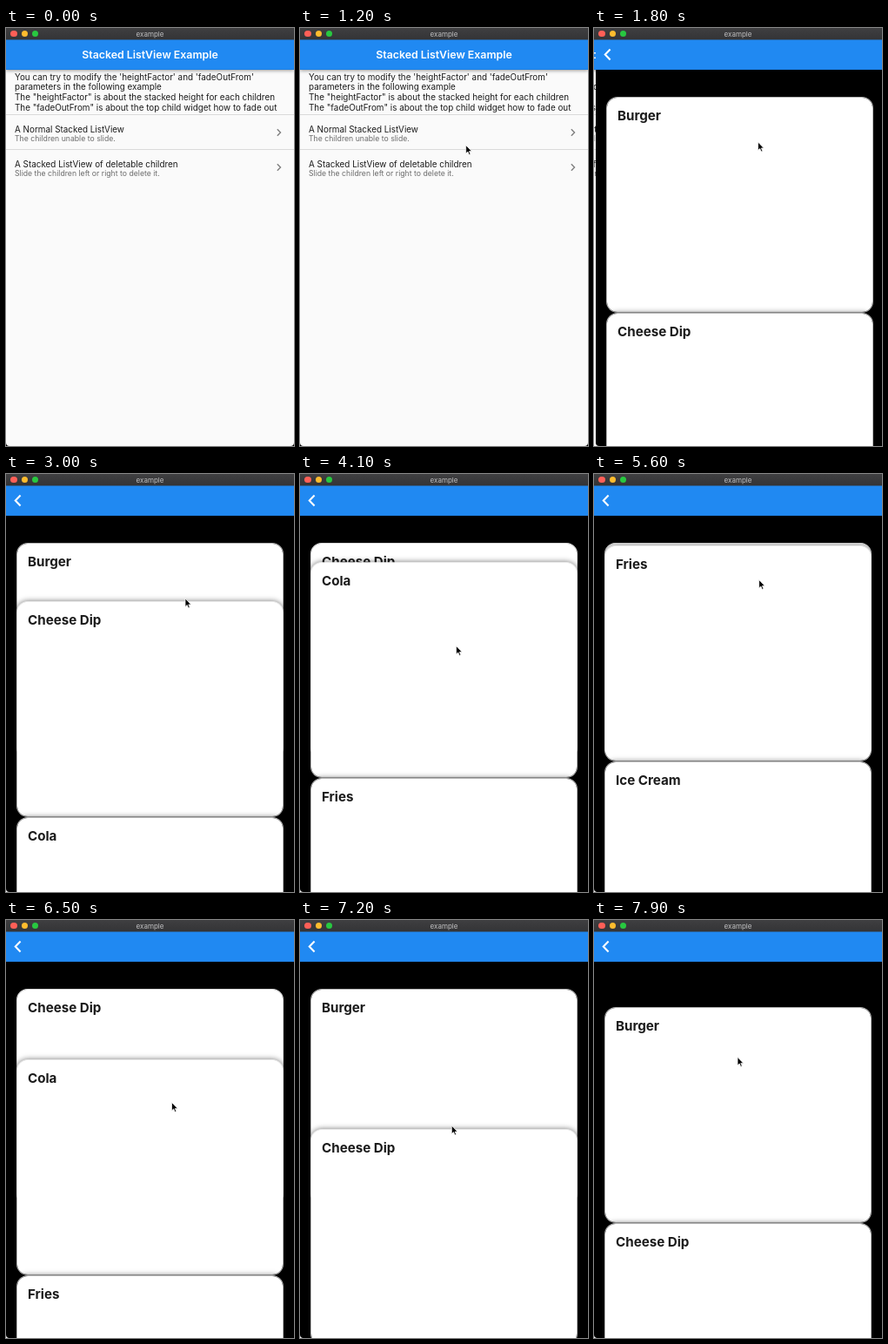
These frames come from a looping animation (331 px wide and 480 px high, 8 s). An HTML page:

```html
<!DOCTYPE html>
<html lang="en">
<head>
<meta charset="utf-8">
<title>example</title>
<style>
  html, body { margin: 0; width: 100%; height: 100%; overflow: hidden; background: #000; }
  body { position: relative; font: 9.88px/16px Inter, sans-serif; color: #1b1b1b; }
  div, svg { position: absolute; white-space: nowrap; }
  .page { inset: 0; overflow: hidden; border-radius: 0 0 4px 4px; }
  #list { background: #fafafa; }
  #cards { background: #000; }
  .bar { top: 13px; left: 0; right: 0; height: 35px; color: #fff; text-align: center;
         background: linear-gradient(#2a6096 1px, #2089f2 0 34px, #1e7fe0 0);
         font: 600 12.35px/35px Inter, sans-serif; }
  #list .bar { box-shadow: 0 1px 4px rgba(0, 0, 0, .4); }
  #intro { left: 10px; top: 50.6px; line-height: 11.8px; }
  .item { left: 0; right: 0; height: 39px; border-top: 1px solid #dadada; }
  .item div { left: 10px; top: 7.5px; }
  .item .sub { top: 19px; font-size: 8.7px; color: #6c6c6c; }
  .item svg { left: 310px; top: 15px; }
  .card { left: 12px; top: 0; width: 305px; height: 246px; border-radius: 13px;
          background: #fff padding-box; border: 1px solid rgba(255, 255, 255, .7);
          box-shadow: 0 0 6px rgba(0, 0, 0, .55); }
  .card div { left: 12px; top: 11px; font: 700 15.15px/20px Inter, sans-serif; }
  #window { left: 0; top: 0; right: 0; height: 13px; background: linear-gradient(#3f3f41, #343436);
            color: #c0c0c2; font-size: 8px; line-height: 14px; text-align: center; }
  #window div { top: 2.6px; width: 7.4px; height: 7.4px; border-radius: 50%; }
  #pointer { left: 0; top: 0; overflow: visible; }
</style>
</head>
<body>
<div class="page" id="list">
  <div class="bar">Stacked ListView Example</div>
  <div id="intro">You can try to modify the 'heightFactor' and 'fadeOutFrom'<br>parameters in the following example<br>The "heightFactor" is about the stacked height for each children<br>The "fadeOutFrom" is about the top child widget how to fade out</div>
</div>
<div class="page" id="cards">
  <div class="bar"><svg width="30" height="35" style="left:0" fill="none" stroke="#fff" stroke-width="2.1"><path d="M16.6 11.5 10.8 17.5l5.8 6"/></svg></div>
</div>
<div id="window">example
  <div style="left:5.2px;background:#ff5f57"></div>
  <div style="left:17.5px;background:#febc2e"></div>
  <div style="left:29.8px;background:#28c840"></div>
</div>
<svg id="pointer" width="8" height="12"><path d="M0 0V9.4L2.2 7.4 3.7 10.9 5.2 10.2 3.8 6.9H6.7Z" fill="#000" stroke="#fff" stroke-width=".7"/></svg>

<script>
const WIDTH = 331, LOOP = 8000, STEP = 100;
const CARD_TOP = 79, CARD_HEIGHT = 248;
const $ = id => document.getElementById(id);

function add(parent, className, html) {
  const el = document.createElement('div');
  el.className = className;
  el.innerHTML = html;
  return parent.appendChild(el);
}

[['A Normal Stacked ListView', 'The children unable to slide.'],
 ['A Stacked ListView of deletable children', 'Slide the children left or right to delete it.']
].forEach(([title, sub], i) => {
  add($('list'), 'item', `<div>${title}</div><div class="sub">${sub}</div>
    <svg width="8" height="10" fill="none" stroke="#808080" stroke-width="1.4"><path d="M1.8 1.2 5.5 5 1.8 8.8"/></svg>`)
    .style.top = 99 + 40 * i + 'px';
});

const cards = ['Burger', 'Cheese Dip', 'Cola', 'Fries', 'Ice Cream']
  .map(name => add($('cards'), 'card', `<div>${name}</div>`));

// Turning points of the drags
const poses = [
  { t: 100, x: 300, y: 318, scroll: 0 },
  { t: 1300, x: 188.5, y: 131, scroll: 0 },
  { t: 1800, x: 188.5, y: 131, scroll: 0 },
  { t: 2400, x: 199, y: 324, scroll: 0 },
  { t: 3000, x: 206, y: 143, scroll: 181 },
  { t: 3500, x: 184, y: 420, scroll: 200 },
  { t: 4100, x: 179.5, y: 197.5, scroll: 474 },
  { t: 4450, x: 179, y: 370, scroll: 500 },
  { t: 4900, x: 180.5, y: 157, scroll: 713 },
  { t: 5700, x: 190, y: 120, scroll: 742 },
  { t: 6500, x: 190.5, y: 209.5, scroll: 415 },
  { t: 7400, x: 172, y: 240, scroll: 40 },
  { t: 7900, x: 165, y: 157.5, scroll: -21 }];

function poseAt(t) {
  const next = Math.max(1, poses.findIndex(pose => pose.t >= t));
  const a = poses[next - 1], b = poses[next];
  const u = Math.max(0, (t - a.t) / (b.t - a.t)), eased = u * u * (3 - 2 * u);
  const mix = key => a[key] + (b[key] - a[key]) * eased;
  return { x: mix('x'), y: mix('y'), scroll: Math.round(mix('scroll')) };
}

// Cubic Bezier easing (.35, .91, .33, .97)
function easeOut(x) {
  if (x <= 0 || x >= 1) return x <= 0 ? 0 : 1;
  const curve = (u, a, b) => 3 * u * (1 - u) * ((1 - u) * a + u * b) + u ** 3;
  let low = 0, high = 1;
  for (let i = 0; i < 20; i++) {
    const mid = (low + high) / 2;
    if (curve(mid, .35, .33) < x) low = mid; else high = mid;
  }
  return curve(low, .91, .97);
}

const move = (el, x, y) => el.style.transform = `translate(${x}px, ${y}px)`;

function draw(t) {
  const push = easeOut((t - 1450) / 400);
  move($('list'), -WIDTH / 3 * push, 0);
  move($('cards'), Math.round(WIDTH * (1 - push)), 0);

  const { x, y, scroll } = poseAt(t);
  cards.forEach((card, i) =>
    move(card, 0, Math.max(CARD_TOP, CARD_TOP + CARD_HEIGHT * i - scroll)));
  $('pointer').style.visibility = t < poses[0].t ? 'hidden' : 'visible';
  move($('pointer'), x, y);
}

const start = performance.now();
function tick() {
  const t = (performance.now() - start) % LOOP;
  draw(Math.floor(t / STEP) * STEP);
  requestAnimationFrame(tick);
}
tick();
</script>
</body>
</html>
```
